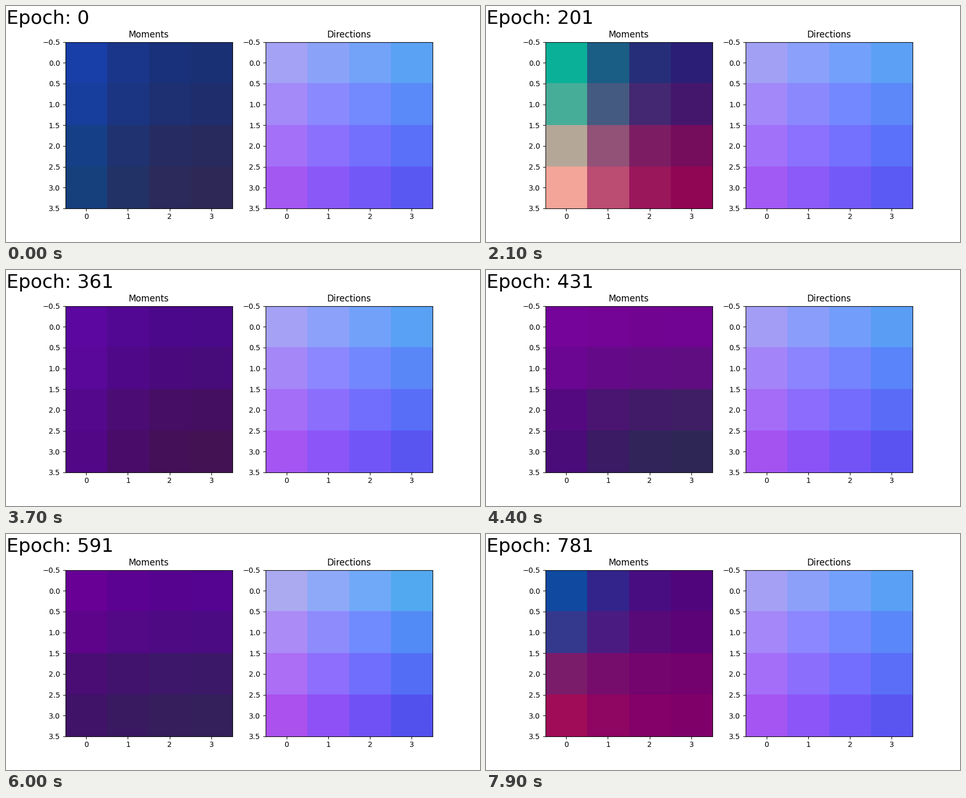
These frames come from a looping animation (900x450 px, 8000 ms). A matplotlib script:

```python
import numpy as np
import matplotlib.pyplot as plt
from matplotlib.animation import FuncAnimation
from matplotlib.colors import to_rgb

FRAMES, STEP_MS, SIZE = 80, 100, 4

# step, spread and lift of the directions, corner colours of the moments (TL TR BL BR)
KEYS = [
    (0, 37, 125, "#183ea8 #1a3075 #15407c #2e2856"),
    (13, 40, 126, "#00706c #3c149c #d68f2a #8a006c"),
    (21, 35, 125, "#0ab098 #2a1e76 #f2a598 #900654"),
    (37, 38, 123, "#5c08a0 #4a0988 #520886 #431253"),
    (51, 36.5, 118, "#8f0094 #9a009c #42106a #1a3c58"),
    (60, 44, 125, "#680096 #540490 #401268 #34205a"),
    (79, 37.5, 123, "#0f4aa0 #50067c #a00c58 #80006a"),
]
STEPS, SPREADS, LIFTS, CORNERS = zip(*KEYS)
CORNERS = np.array([[to_rgb(c) for c in names.split()] for names in CORNERS])

grid = np.linspace(0, 1, SIZE)
ease_out = (1 - (1 - grid) ** 2)[None, :, None]
smooth = (grid**2 * (3 - 2 * grid))[:, None, None]


def mix(a, b, t):
    return a + (b - a) * t


def moments(step):
    """Corner colours spread over the grid and drifting between the keys."""
    k = min(np.searchsorted(STEPS, step, side="right") - 1, len(STEPS) - 2)
    t = (step - STEPS[k]) / (STEPS[k + 1] - STEPS[k])
    tl, tr, bl, br = mix(CORNERS[k], CORNERS[k + 1], t)
    return mix(mix(tl, tr, ease_out), mix(bl, br, ease_out), smooth)


def directions(step):
    """Unit normals shown as colours: x falls along columns, y down rows."""
    spread = np.interp(step, STEPS, SPREADS)
    lift = np.interp(step, STEPS, LIFTS)
    ramp = spread * (1 - 2 * grid)
    x, y = np.meshgrid((127.5 + ramp) / 127.5 - 1, (lift + ramp) / 127.5 - 1)
    z = np.sqrt(1 - x**2 - y**2)
    return (np.stack([x, y, z], axis=-1) + 1) / 2


fig, axes = plt.subplots(1, 2, figsize=(9, 4.5), dpi=100)
panels = []
for ax, title, colours in zip(axes, ("Moments", "Directions"), (moments, directions)):
    panels.append((ax.imshow(colours(0)), colours))
    ax.set_title(title)
    ax.set_xticks(range(SIZE))
    ax.set_yticks(np.arange(-0.5, SIZE, 0.5))
label = fig.text(1 / 900, 416 / 450, "Epoch: 0", fontsize=26)


def update(step):
    for image, colours in panels:
        image.set_data(colours(step))
    label.set_text(f"Epoch: {max(0, 10 * step - 9)}")
    return [image for image, _ in panels] + [label]


anim = FuncAnimation(fig, update, frames=FRAMES, interval=STEP_MS, repeat=True, repeat_delay=0)
plt.show()
```
